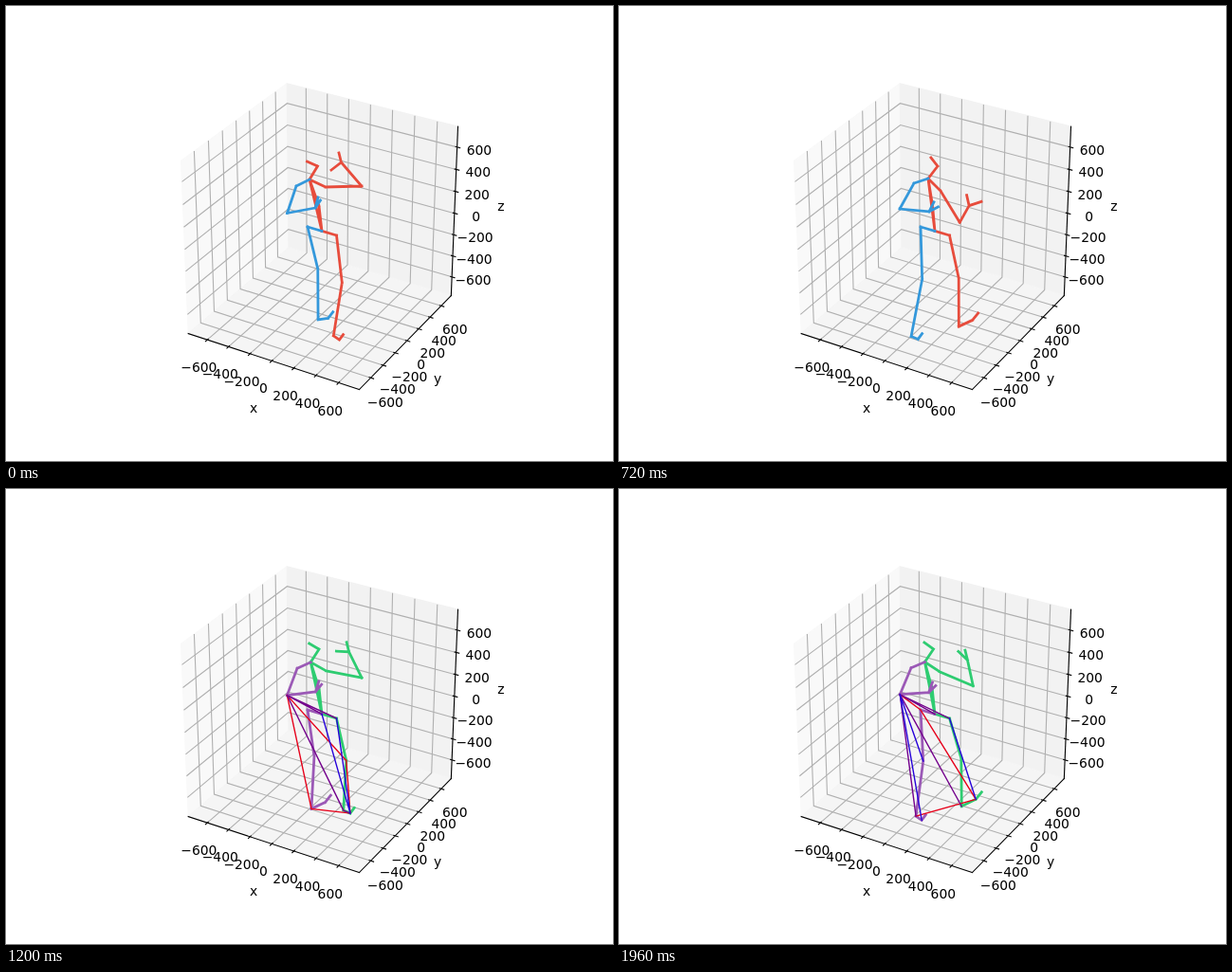
An HTML page that plays this animation: 640x480 px, repeating every 2 s.

```html
<!DOCTYPE html>
<html lang="en">
<head>
<meta charset="utf-8">
<title>Walking skeleton</title>
<style>
  html, body { margin: 0; width: 100%; height: 100%; overflow: hidden; background: #fff; }
  svg { display: block; width: 100%; height: 100%; }
  text { font: 13.89px "DejaVu Sans", sans-serif; text-anchor: middle; fill: #000; }
  path { fill: none; }
  .pane { stroke-width: 1.2; stroke-linejoin: round; }
  .grid { stroke: #b0b0b0; stroke-width: 1.11; }
  .axis { stroke: #000; stroke-width: 1.11; stroke-linecap: square; }
  .bones { stroke-width: 2.78; stroke-linecap: square; }
  .link { stroke-width: 1.39; stroke-linecap: square; }
</style>
</head>
<body>
<svg id="stage" viewBox="0 0 640 480"></svg>
<script>
const stage = document.getElementById('stage');

function add(tag, attrs, text) {
  const el = document.createElementNS('http://www.w3.org/2000/svg', tag);
  for (const key in attrs) el.setAttribute(key, attrs[key]);
  if (text) el.textContent = text;
  stage.appendChild(el);
  return el;
}

const toPath = points => 'M' + points.map(p => p.map(v => v.toFixed(2)).join(' ')).join('L');
const lerp = (a, b, k) => a + (b - a) * k;

// Camera at azimuth -60, elevation 30, distance 10; the box spans -0.5 to 0.5.
function project(x, y, z) {
  const scale = 1998 / (10 - (0.433 * x - 0.75 * y + 0.5 * z));
  return [333 + scale * (0.866 * x + 0.5 * y),
          237.4 - scale * (-0.25 * x + 0.433 * y + 0.866 * z)];
}

const line3 = points => toPath(points.map(p => project(...p)));

function drawAxes() {
  const e = 0.5 + 1 / 48, pad = 0.0865;
  const panes = [
    ['#f9f9f9', [[-e, -e, -e], [-e, e, -e], [-e, e, e], [-e, -e, e]]],
    ['#f2f2f2', [[-e, e, -e], [e, e, -e], [e, e, e], [-e, e, e]]],
    ['#f5f5f5', [[-e, -e, -e], [e, -e, -e], [e, e, -e], [-e, e, -e]]]
  ];
  for (const [color, corners] of panes)
    add('path', { class: 'pane', d: line3(corners) + 'Z', style: `fill:${color};stroke:${color}` });

  const axes = [
    { edge: v => [v, -e, -e], out: [0, -1, 0], shift: [0, -pad, -pad],
      grid: v => [[v, -e, -e], [v, e, -e], [v, e, e]], name: ['x', 261, 429] },
    { edge: v => [e, v, -e], out: [1, 0, 0], shift: [pad, 0, -pad],
      grid: v => [[e, v, -e], [-e, v, -e], [-e, v, e]], name: ['y', 455, 398] },
    { edge: v => [e, e, v], out: [1, 0, 0], shift: [pad, pad, 0],
      grid: v => [[-e, -e, v], [-e, e, v], [e, e, v]], name: ['z', 522, 216] }
  ];
  const move = (p, d, k) => p.map((v, i) => v + d[i] * k);
  const values = Array.from({ length: 7 }, (_, i) => 200 * i - 600);

  for (const a of axes) {
    add('path', { class: 'axis', d: line3([a.edge(-e), a.edge(e)]) });
    for (const value of values) add('path', { class: 'grid', d: line3(a.grid(value / 1500)) });
    for (const value of values) {
      const p = a.edge(value / 1500);
      add('path', { class: 'axis', d: line3([move(p, a.out, 1 / 60), move(p, a.out, -1 / 120)]) });
      const [x, y] = project(...move(p, a.shift, 1));
      add('text', { x, y: Math.round(y + 11) }, String(value).replace('-', '\u2212'));
    }
    const [label, x, y] = a.name;
    add('text', { x, y }, label);
  }
}

// Upper body: joint, parent, bone with the arms raised, bone with the arms lowered.
const upperBones = [
  ['chest', 'root', [-13, -54.4], [-7, -55.4]],
  ['neck', 'chest', [8.5, -14], [10, -13]],
  ['head', 'neck', [-11, -5], [-7, -9]],
  ['rs', 'chest', [17, 8], [13, 13]],
  ['re', 'rs', [38, -1], [20, 33.5]],
  ['rw', 're', [-21.5, -25], [10, -17.5]],
  ['rf', 'rw', [-2.5, -10], [-2.5, -11]],
  ['rt', 'rw', [-10.5, 8], [13, -4]],
  ['ls', 'chest', [-14, 7], [-15, 5]],
  ['le', 'ls', [-9.5, 28.5], [-15, 27]],
  ['lw', 'le', [29.5, -5.5], [31, 3]],
  ['lf', 'lw', [3, -11], [5, -10]],
  ['lt', 'lw', [5.5, -8], [9.5, -5]]
];

const TURN = 2 * Math.PI;

// Every bone turns clockwise from its first direction to its second.
function swing([ax, ay], [bx, by], k) {
  const from = Math.atan2(ay, ax);
  const angle = from + k * ((Math.atan2(by, bx) - from + TURN) % TURN);
  const length = lerp(Math.hypot(ax, ay), Math.hypot(bx, by), k);
  return [length * Math.cos(angle), length * Math.sin(angle)];
}

const walk = {
  right: '#e74c3c', left: '#3498db',
  period: 1150, leftLag: 100, rightLag: 440, shin: 0.9,
  lower: t => (1 - Math.cos(Math.PI * t / 760)) / 2
};
const forecast = {
  right: '#2ecc71', left: '#9b59b6',
  period: 2000, leftLag: -270, rightLag: 650, shin: 0.45,
  lower: t => 0.42 * (1 - Math.exp(-t / 300))
};

// Thigh, shin and foot swing like pendulums, each a little later than the last.
function addLeg(joints, name, side, turn, shinSwing) {
  const wave = delay => Math.cos(TURN * (turn - delay));
  const thigh = wave(0), shin = shinSwing * wave(0.05) - 0.05, foot = wave(0.16);
  const bones = [
    ['k', 8 + 1.5 * side + 5 * thigh, 47.5 - 2 * side - 6 * thigh],
    ['a', -3 + side + 8 * shin, 54 - 2 * side - 4.5 * shin],
    ['b', 10.5 + 4.5 * foot, -1.5 - 6 * foot],
    ['z', 5 + foot, -6.5 - foot]
  ];
  let [x, y] = joints[name + 'h'];
  for (const [part, dx, dy] of bones) joints[name + part] = [x += dx, y += dy];
}

function poseAt(t, style) {
  const joints = { root: [333, 237.4], lh: [318, 233], rh: [348.5, 242] };
  const lowered = style.lower(t);
  for (const [name, parent, raised, low] of upperBones) {
    const bone = swing(raised, low, lowered);
    joints[name] = joints[parent].map((v, i) => v + bone[i]);
  }
  const [x, y] = joints.chest;
  joints.spine = [(x + 333) / 2 + 3.5 - (x - 320) * 0.4, (y + 237) / 2 + 1];
  addLeg(joints, 'l', -1, (t - style.leftLag) / style.period, style.shin);
  addLeg(joints, 'r', 1, (t - style.rightLag) / style.period, style.shin);
  return joints;
}

const pairs = text => text.split(' ').map(p => p.split('-'));
const limbs = side => pairs('root-#h #h-#k #k-#a #a-#b #b-#z chest-#s #s-#e #e-#w #w-#f #w-#t'
  .replaceAll('#', side));
const leftBones = limbs('l');
const rightBones = [...limbs('r'), ...pairs('root-spine spine-chest root-chest chest-neck neck-head')];

// Strongest links are red, weakest blue; each set holds for a while.
const linkSets = [
  { until: 200, red: 'le-rh rh-rb', violet: 'rw-rs rs-re rh-lb root-rb', blue: 'lh-rh rk-rb' },
  { until: 520, red: 'le-la le-rk rk-rb la-rb', violet: 'le-rh le-ra le-root ra-rb', blue: 'root-rb rh-rb' },
  { until: 800, red: 'le-la le-rh le-root le-lh la-rb', violet: 'le-ra le-rk', blue: 'le-lb root-rb lh-rb' },
  { until: 1000, red: 'le-lh lh-rb la-rb', violet: 'le-la le-ra le-root le-rh', blue: 'le-lb le-lk rh-rb' }
];
const linkColors = { red: '#e6001a', violet: '#73008c', blue: '#2600d9' };

drawAxes();
const rightPath = add('path', { class: 'bones' });
const leftPath = add('path', { class: 'bones' });
const linkPaths = Object.entries(linkColors).map(([name, stroke]) =>
  [name, add('path', { class: 'link', stroke })]);

function draw(time) {
  const t = time % 1000;
  const style = time < 1000 ? walk : forecast;
  const pose = poseAt(t, style);
  const lines = list => list.map(([a, b]) => toPath([pose[a], pose[b]])).join('');

  rightPath.setAttribute('d', lines(rightBones));
  rightPath.setAttribute('stroke', style.right);
  leftPath.setAttribute('d', lines(leftBones));
  leftPath.setAttribute('stroke', style.left);

  const links = linkSets.find(set => t < set.until);
  for (const [name, path] of linkPaths)
    path.setAttribute('d', style === forecast ? lines(pairs(links[name])) : '');
}

const start = performance.now();
function tick() {
  const time = (performance.now() - start) % 2000;
  draw(Math.floor(time / 40) * 40);
  requestAnimationFrame(tick);
}
tick();
</script>
</body>
</html>
```
